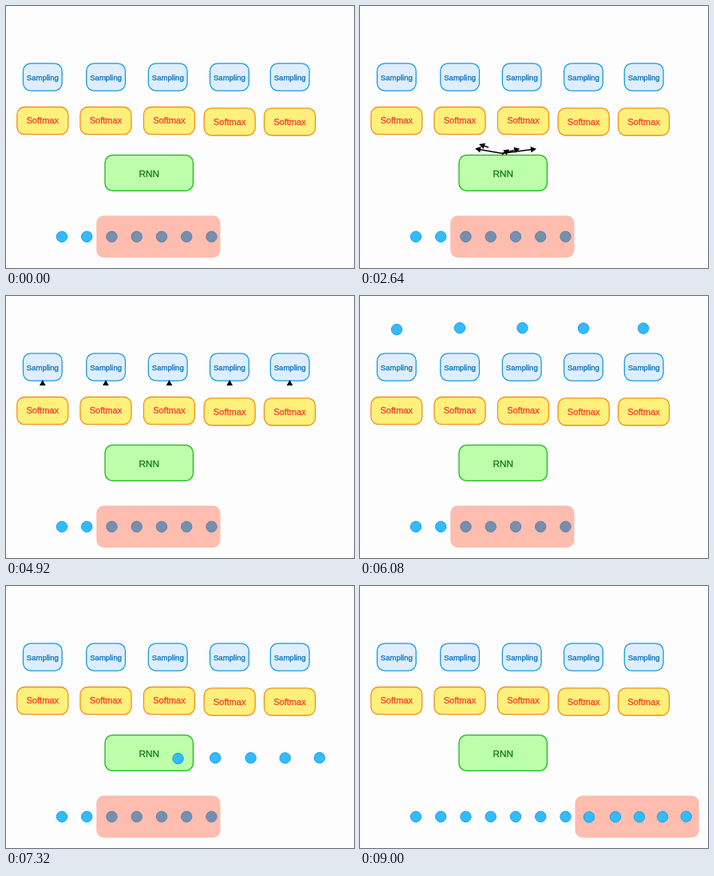
An HTML page for the animation above (9.04 s loop, 436 px wide and 328 px high).

```html
<!DOCTYPE html>
<html lang="en">
<head>
<meta charset="utf-8">
<title>RNN sampling</title>
<style>
  html, body { margin: 0; width: 100%; height: 100%; overflow: hidden; background: #fefdfe; }
  svg { display: block; width: 436px; height: 328px; }
  text { font-family: "Liberation Sans", Arial, sans-serif; text-anchor: middle; stroke-width: .3; }
  .sampling rect { fill: #deeefe; stroke: #169ae0; }
  .sampling text { fill: #0c74b6; stroke: #0c74b6; font-size: 9.6px; }
  .softmax rect { fill: #fff07c; stroke: #f29111; }
  .softmax text { fill: #f0412e; stroke: #f0412e; font-size: 11.1px; }
  .rnn rect { fill: #bdffa9; stroke: #17b91b; }
  .rnn text { fill: #0f7c12; stroke: #0f7c12; font-size: 11.8px; }
  .box rect { stroke-width: 1.3; }
  .dot { fill: #33bbff; stroke: #1a9cee; stroke-width: 1; }
  #window { fill: rgba(250, 55, 5, .32); }
  .line { fill: none; stroke: #000; stroke-width: 1.4; }
  .open { fill: none; stroke: #000; stroke-width: 1.3; stroke-linecap: round; }
</style>
</head>
<body>
<svg id="stage" viewBox="0 0 436 328"></svg>
<script>
const LOOP = 9040;
const stage = document.getElementById('stage');

function add(tag, attrs, parent = stage) {
  const el = document.createElementNS('http://www.w3.org/2000/svg', tag);
  for (const key in attrs) el.setAttribute(key, attrs[key]);
  parent.append(el);
  return el;
}

function box(kind, label, x, y, width, height, rx, baseline) {
  const g = add('g', { class: 'box ' + kind });
  add('rect', { x, y, width, height, rx }, g);
  add('text', { x: x + width / 2, y: y + baseline }, g).textContent = label;
}

const dot = (cx, cy) => add('circle', { class: 'dot', cx, cy, r: 6.7 });

// Eased progress of time t between start and end, clamped to 0..1
function ease(t, [start, end]) {
  const p = Math.min(1, Math.max(0, (t - start) / (end - start)));
  return (1 - Math.cos(Math.PI * p)) / 2;
}

const mix = (a, b, p) => a + (b - a) * p;

// An arrow that draws itself on, then is wiped away from its tail
function arrow(d, drawIn, drawOut, open) {
  const g = add('g', {});
  const line = add('path', { class: 'line', d }, g);
  const head = add('path', open
    ? { class: 'open', d: 'M-6.5-3.2L0 0L-5.2 4.2' }
    : { d: 'M0 0L-7-3.8V3.8Z' }, g);
  const length = line.getTotalLength();
  const inset = open ? 0 : 5;

  return t => {
    const shown = t > drawIn[0] && t < drawOut[1];
    g.setAttribute('visibility', shown ? 'visible' : 'hidden');
    if (!shown) return;
    const tip = length * ease(t, drawIn);
    const tail = length * ease(t, drawOut);
    const ink = Math.max(0, tip - inset - tail);
    line.setAttribute('visibility', ink ? 'inherit' : 'hidden');
    line.setAttribute('stroke-dasharray', `0 ${tail} ${ink} ${length * 2}`);
    const end = Math.max(tip, 1);
    const a = line.getPointAtLength(Math.max(0, end - 3));
    const b = line.getPointAtLength(end);
    const angle = Math.atan2(b.y - a.y, b.x - a.x) * 180 / Math.PI;
    head.setAttribute('transform', `translate(${b.x} ${b.y}) rotate(${angle})`);
  };
}

const samplingX = [21.5, 100.8, 178.4, 255.6, 331.3];
const softmaxX = [13.8, 93, 172.5, 248.2, 323.5];

samplingX.forEach(x => box('sampling', 'Sampling', x, 71.8, 48.7, 34.3, 9.5, 20.8));
softmaxX.forEach((x, i) => box('softmax', 'Softmax', x, i < 3 ? 126.5 : 127.8, 64, 34.2, 9.5, 20.7));
box('rnn', 'RNN', 124, 186.7, 110.5, 44.6, 9.5, 27.2);

for (let i = 0; i < 7; i++) dot(70 + 31.25 * i, 288.8);
const frame = add('rect', { id: 'window', x: 113.3, y: 262.5, width: 155.2, height: 52.5, rx: 9 });

const clearInput = [2250, 2550];
const fanIn = [2480, 2950], fanOut = [2960, 3940];
const liftIn = [3960, 4430], liftOut = [4480, 4970];
const rise = [4950, 5950], drop = [6715, 7670], slide = [7705, 8705];

const arrows = [
  arrow('M179 262V243.5', [300, 1100], clearInput),
  arrow('M235 222Q252 218 264 207.5C278 194 262 186 235 196', [1240, 2240], clearInput, true),
  ...['M178 184.5L47.5 161.7', 'M161 177L115.5 162', 'M178 186L213 161',
      'M178 184.5L264 162', 'M178 184.5L343.5 162.5'].map(d => arrow(d, fanIn, fanOut)),
  ...softmaxX.map(x => arrow(`M${x + 32} 126.5V105`, liftIn, liftOut))
];

// Sampled values: where each one rises to and where it lands
const samples = [
  [46, 42, 287, 289.3],
  [125, 40, 320, 289],
  [203.5, 40, 350, 289],
  [280, 40.5, 379, 289],
  [355, 40.5, 408.7, 288.6]
].map(([x, y, toX, toY]) => ({ x, y, toX, toY, el: dot(x, y) }));

function draw(t) {
  arrows.forEach(update => update(t));
  const up = ease(t, rise), down = ease(t, drop);
  for (const s of samples) {
    s.el.setAttribute('cx', mix(s.x, s.toX, down));
    s.el.setAttribute('cy', mix(mix(78, s.y, up), s.toY, down));
    s.el.setAttribute('opacity', Math.min(1, up * 2));
  }
  frame.setAttribute('transform', `translate(${156.2 * ease(t, slide)} 0)`);
}

let begin;
function tick(now) {
  begin ??= now;
  draw((now - begin) % LOOP);
  requestAnimationFrame(tick);
}
draw(0);
requestAnimationFrame(tick);
</script>
</body>
</html>
```
